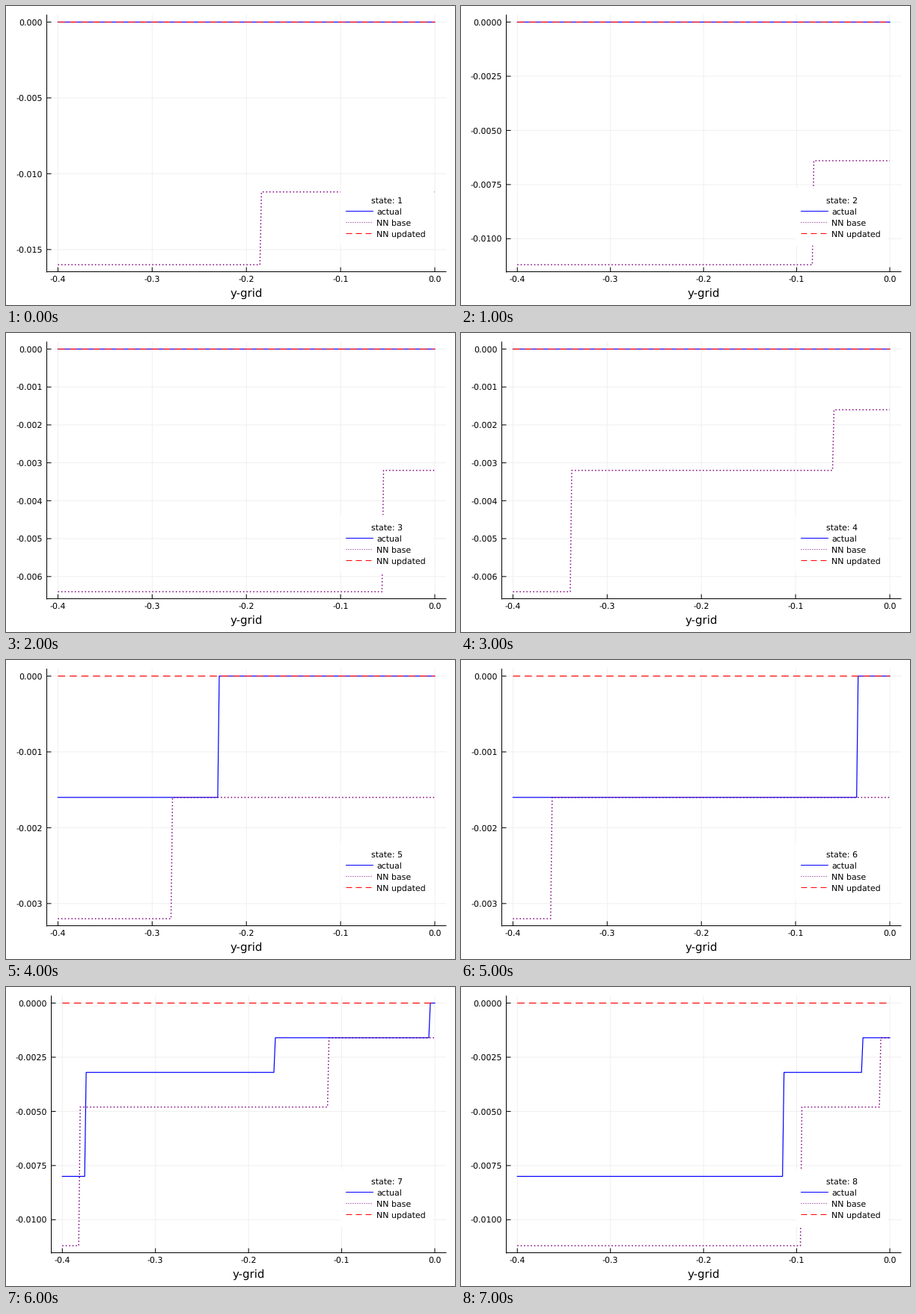
Write a matplotlib script that moves like this. It is 600x400 px and loops after 8 s.

```python
import matplotlib
import matplotlib.pyplot as plt
import numpy as np
from matplotlib.animation import FuncAnimation
from matplotlib.patches import Rectangle

matplotlib.rcParams["font.family"] = "DejaVu Sans"
matplotlib.rcParams["text.hinting"] = "none"
matplotlib.rcParams["path.snap"] = False

PX = 0.72                       # one pixel in points at 100 dpi
TOP, BOTTOM, RIGHT = 12, 355.5, 588
ZERO_X, ZERO_Y, LOW_Y = 573, 21.5, 346.1
DASH, DOT = (0, (8, 5)), (0, (1, 2))
UNIT = 0.0016                   # all levels are multiples of this
GRID = np.linspace(-0.4, 0, 251)

# Per state: (levels, jumps) of the actual and of the base policy.
FLAT = ([0], [])
STATES = [
    (FLAT, ([10, 7], [-0.185])),
    (FLAT, ([7, 4], [-0.082])),
    (FLAT, ([4, 2], [-0.055])),
    (FLAT, ([4, 2, 1], [-0.338, -0.060])),
    (([1, 0], [-0.229]), ([2, 1], [-0.279])),
    (([1, 0], [-0.035]), ([2, 1], [-0.359])),
    (([5, 2, 1, 0], [-0.375, -0.172, -0.005]), ([7, 3, 1], [-0.381, -0.114])),
    (([5, 2, 1], [-0.114, -0.029]), ([7, 3, 1], [-0.096, -0.010])),
]

fig = plt.figure(figsize=(6, 4), dpi=100, facecolor="white")
ax = fig.add_axes([0, 0, 1, 1])


def line(xs, ys, color, width=1, **kw):
    ax.plot(xs, ys, color=color, lw=width * PX, dash_capstyle="butt", **kw)


def label(x, y, text, size=11, ha="left"):
    ax.text(x, y, text, fontsize=size * PX, ha=ha, va="baseline", zorder=6)


def policy(levels, jumps):
    return -UNIT * np.array(levels)[np.searchsorted(jumps, GRID)]


def tick_step(low):
    if low < 0.01:
        return 0.001
    return 0.0025 if low < 0.015 else 0.005


def draw_legend(number):
    ax.add_patch(Rectangle((447, 243.5), 123.5, 77, fc="white", ec="none",
                           zorder=5))
    label(509.5, 263.7, f"state: {number}", ha="center")
    rows = [("actual", "blue", "-"), ("NN base", "purple", DOT),
            ("NN updated", "red", DASH)]
    for i, (name, color, style) in enumerate(rows):
        y = 274.5 + 15 * i
        line([454.5, 490.5], [y, y], color, ls=style, zorder=6)
        label(495.2, y + 4, name)


def draw(i):
    actual, base = (policy(*curve) for curve in STATES[i])
    low = -base.min()
    step = tick_step(low)
    decimals = 4 if step == 0.0025 else 3
    # longer tick labels push the axis to the right
    left = 60.5 if decimals == 4 else 54.5
    start_x = left + 0.028 * (RIGHT - left)

    def to_x(v):
        return ZERO_X + v / 0.4 * (ZERO_X - start_x)

    def to_y(v):
        return ZERO_Y - v / low * (LOW_Y - ZERO_Y)

    ax.clear()
    ax.set(xlim=(0, 600), ylim=(400, 0))
    ax.axis("off")

    for k in range(5):
        x = to_x(-0.1 * k)
        line([x, x], [TOP, BOTTOM], "#f0f0f0", zorder=1)
        line([x, x], [BOTTOM, BOTTOM - 5.5], "black", zorder=2)
        label(x, 369.2, "-" * (k > 0) + f"{0.1 * k:.1f}", ha="center")
    for k in range(int(low / step) + 1):
        y = to_y(-step * k)
        line([left, RIGHT], [y, y], "#f0f0f0", zorder=1)
        line([left, left + 5.5], [y, y], "black", zorder=2)
        label(left - 5.3, y + 4, "-" * (k > 0) + f"{step * k:.{decimals}f}",
              ha="right")
    line([left, left], [TOP, BOTTOM + 0.5], "black", zorder=2)
    line([left, RIGHT], [BOTTOM, BOTTOM], "black", zorder=2)
    label((left + RIGHT) / 2, 389, "y-grid", 15, "center")

    xs = to_x(GRID)
    line(xs, to_y(actual), "blue", 1.2, zorder=3)
    line(xs, to_y(base), "purple", 1.5, ls=DOT, zorder=3)
    line(xs, to_y(0 * GRID), "red", 1.2, ls=DASH, zorder=3)
    draw_legend(i + 1)
    return []


anim = FuncAnimation(fig, draw, frames=len(STATES), interval=1000,
                     init_func=lambda: draw(0), repeat=True, repeat_delay=0)
plt.show()
```
